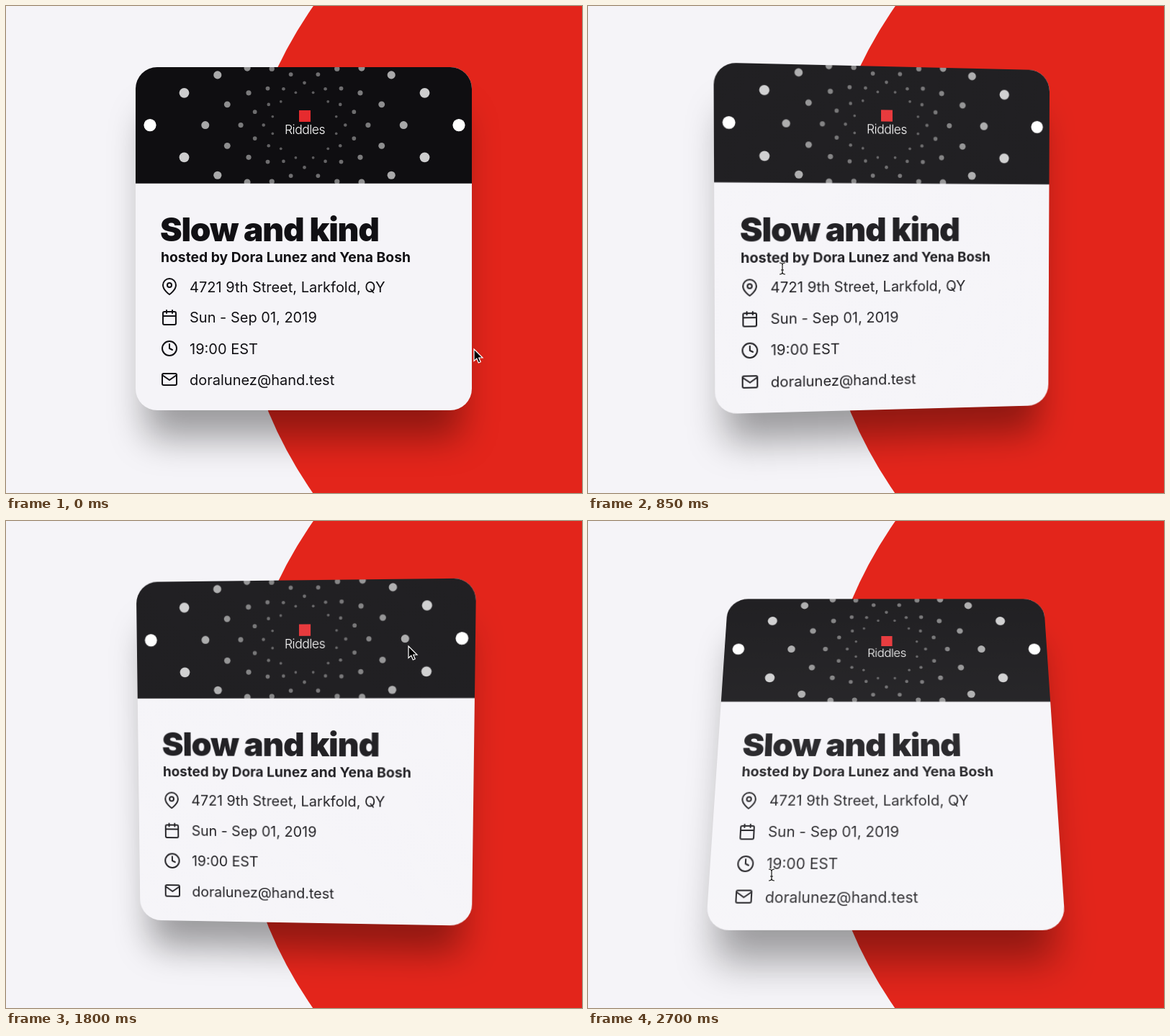
Animation, 800 px wide and 677 px high, one loop 2750 ms. Source, as an HTML page:

```html
<!DOCTYPE html>
<html lang="en">
<head>
<meta charset="utf-8">
<title>Tilting event card</title>
<style>
  html, body { margin: 0; width: 100%; height: 100%; overflow: hidden; }
  body { position: relative; background: #f5f4f8; }
  .disc { position: absolute; left: 320px; top: -252.5px; width: 1182px; height: 1182px; border-radius: 50%; background: #e3251b; }
  .card {
    position: absolute; left: 180px; top: 85px; width: 467px; height: 477px;
    border-radius: 30px; overflow: hidden; background: #f5f4f8;
    box-shadow: 0 52px 50px -14px rgba(0, 0, 0, .37);
  }
  .card svg, .glare { position: absolute; left: 0; top: 0; width: 100%; height: 100%; }
  text { font: 400 20px Inter, sans-serif; fill: #111014; }
  .title { font-size: 46px; font-weight: 900; letter-spacing: -1.2px; }
  .hosts { font-size: 19.3px; font-weight: 700; }
  .brand { font-size: 17.5px; font-weight: 300; letter-spacing: -.5px; fill: #fff; text-anchor: middle; }
  .icon { fill: none; stroke: #111014; stroke-width: 2; stroke-linecap: round; stroke-linejoin: round; }
  .cursor { position: absolute; left: 0; top: 0; width: 24px; height: 28px; overflow: visible; }
</style>
</head>
<body>
<div class="disc"></div>
<div class="card" id="card">
  <svg viewBox="180 85 467 477">
    <rect x="180" y="85" width="467" height="161.7" fill="#0f0e11"/>
    <svg x="180" y="85" width="467" height="162" viewBox="180 85 467 162"><g id="dots" fill="#fff"></g></svg>
    <rect x="407" y="145" width="16" height="16" fill="#e62b2e"/>
    <text class="brand" x="415" y="178">Riddles</text>

    <text class="title" x="214" y="327">Slow and kind</text>
    <text class="hosts" x="215" y="356">hosted by Dora Lunez and Yena Bosh</text>
    <text x="255" y="397.5">4721 9th Street, Larkfold, QY</text>
    <text x="255" y="440">Sun - Sep 01, 2019</text>
    <text x="255" y="483.5">19:00 EST</text>
    <text x="255" y="527">doralunez@hand.test</text>

    <g class="icon">
      <g transform="translate(215 378)">
        <path d="M21 10c0 7-9 13-9 13s-9-6-9-13a9 9 0 0 1 18 0z"/><circle cx="12" cy="10" r="3"/>
      </g>
      <g transform="translate(215 421)">
        <rect x="3" y="4" width="18" height="18" rx="2"/><path d="M16 2v4M8 2v4M3 10h18"/>
      </g>
      <g transform="translate(215 464)">
        <circle cx="12" cy="12" r="10"/><path d="M12 6v6l4 2"/>
      </g>
      <g transform="translate(215 507)">
        <rect x="2" y="4" width="20" height="16" rx="2"/><path d="M22 6l-10 7L2 6"/>
      </g>
    </g>
  </svg>
  <div class="glare" id="glare"></div>
</div>
<svg class="cursor" id="cursor">
  <path id="arrow" d="M0 0V16.5L3.8 13L6.3 19L9.2 17.8L6.7 12H12Z" fill="#000" stroke="#fff" stroke-width="1.2"/>
  <g id="beam" fill="none">
    <path d="M-4-8q4 0 4 3v10q0 3-4 3M4-8q-4 0-4 3v10q0 3 4 3M-2 2h4" stroke="#fff" stroke-width="2.6"/>
    <path d="M-4-8q4 0 4 3v10q0 3-4 3M4-8q-4 0-4 3v10q0 3 4 3M-2 2h4" stroke="#111" stroke-width="1.2"/>
  </g>
</svg>
<script>
const LOOP = 2750, STEP = 50;
const $ = id => document.getElementById(id);

// time, pointer x, pointer y, rotateX, rotateY
const KEYS = [
  [0, 650, 477, 0, 0],
  [250, 590, 330, 4, -11],
  [550, 370, 249, -6.1, -5],
  [850, 270, 365, -1, 6],
  [1150, 264, 512, 9.6, 11.8],
  [1350, 310, 460, 12.5, 11],
  [1550, 431, 320, 10.1, 6.9],
  [1800, 559, 174, -3.1, -3.5],
  [2060, 598, 265, -4, -12],
  [2350, 558, 459, 4.8, -11.8],
  [2520, 430, 515, 12.5, -8],
  [2700, 255, 492, 16, 0]
];

// Smooth curve through the keys
function sample(t, col) {
  let i = 0;
  while (i < KEYS.length - 2 && t >= KEYS[i + 1][0]) i++;
  const slope = k => {
    const a = KEYS[Math.max(k - 1, 0)], b = KEYS[Math.min(k + 1, KEYS.length - 1)];
    return (b[col] - a[col]) / (b[0] - a[0]);
  };
  const p = KEYS[i], q = KEYS[i + 1], span = q[0] - p[0];
  const u = Math.min((t - p[0]) / span, 1), v = 1 - u;
  return v * v * (1 + 2 * u) * p[col] + u * u * (3 - 2 * u) * q[col]
    + span * u * v * (v * slope(i) - u * slope(i + 1));
}

// Dots on mirrored logarithmic spirals
function drawDots() {
  let out = "";
  for (let arm = 0; arm < 4; arm++) {
    for (let k = 0; k <= 6; k++) {
      const r = 214.5 * 0.642 ** arm * 0.806 ** k;
      if (r < 38) continue;
      const angle = k * Math.PI / 12, dx = r * Math.cos(angle), dy = r * Math.sin(angle);
      const alpha = .25 + .75 * (r / 214.5) ** 1.5;
      for (const sx of k < 6 ? [-1, 1] : [1])
        for (const sy of k ? [-1, 1] : [1])
          out += `<circle cx="${414.5 + sx * dx}" cy="${165.6 + sy * dy}" r="${r * .04}" opacity="${alpha}"/>`;
    }
  }
  $("dots").innerHTML = out;
}

function draw(now) {
  const t = Math.floor(now % LOOP / STEP) * STEP;
  const [x, y, rx, ry] = [1, 2, 3, 4].map(col => sample(t, col));
  $("card").style.transform = `perspective(1000px) rotateX(${rx}deg) rotateY(${ry}deg)`;

  const sheen = .075 * Math.min(t / 200, 1), low = sheen + Math.max(rx, 0) * .005;
  $("glare").style.background =
    `linear-gradient(rgba(255,255,255,${sheen}), rgba(255,255,255,${low}))`;

  const overText = x > 215 && x < 525 && y > 290 && y < 535;
  $("cursor").style.transform = `translate(${x}px, ${y}px)`;
  $("arrow").style.display = overText ? "none" : "";
  $("beam").style.display = overText ? "" : "none";
  requestAnimationFrame(() => draw(performance.now() - start));
}

drawDots();
const start = performance.now();
draw(0);
</script>
</body>
</html>
```
